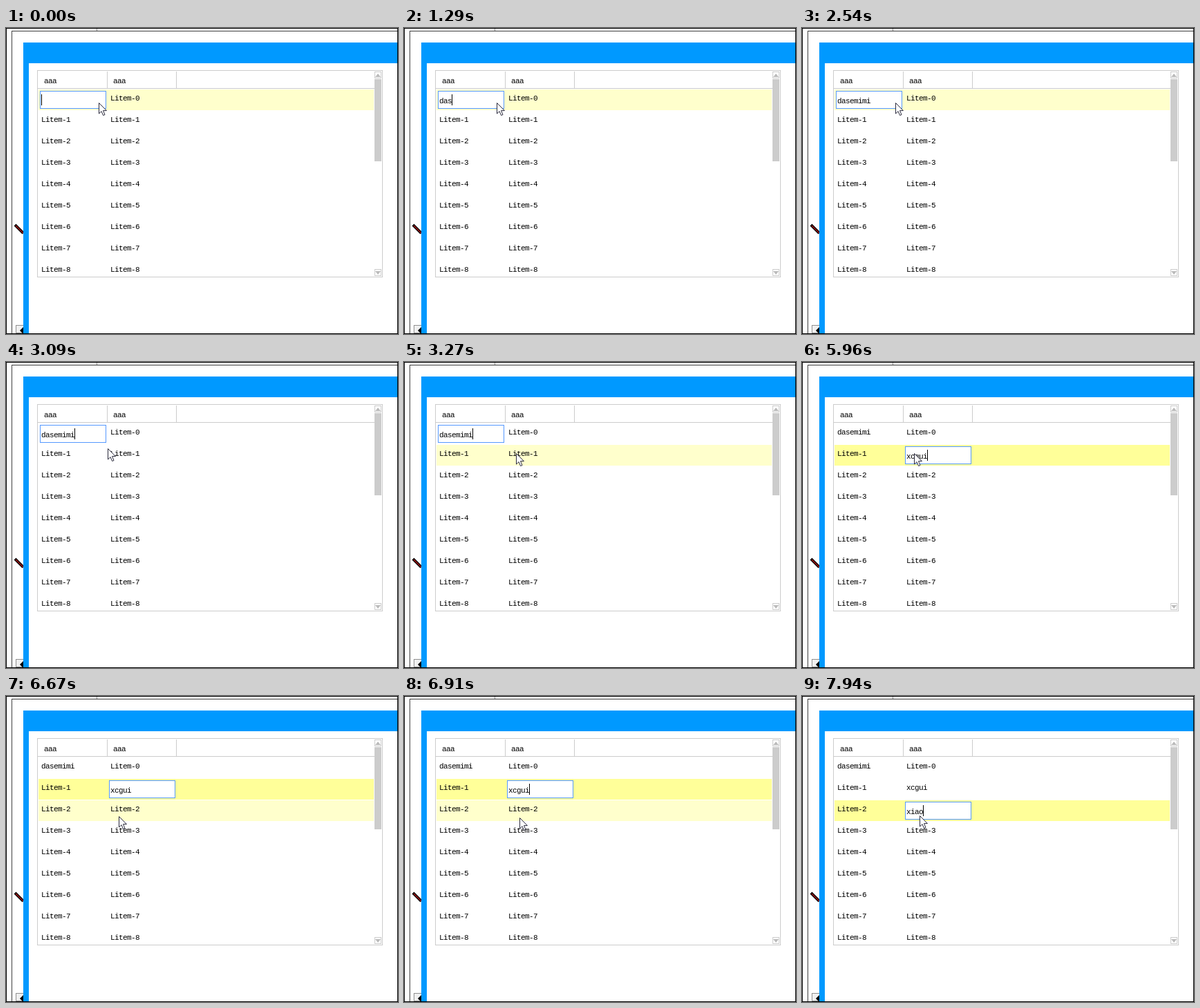
Recreate the animation shown at these times as an HTML page. Size 567 by 443 pixels, loop 8 s.

```html
<!DOCTYPE html>
<html>
<head>
<meta charset="utf-8">
<title>Editable list</title>
<style>
  html, body { margin: 0; width: 100%; height: 100%; overflow: hidden; background: #fff; }
  svg { display: block; }
  rect { shape-rendering: crispEdges; }
  text { font: 11px "Liberation Mono", monospace; letter-spacing: -.6px; }
</style>
</head>
<body>
<svg id="stage" width="567" height="443" viewBox="0 0 567 443"></svg>
<script>
const LOOP = 8000, ROW = 31, TOP = 89, COL = 100;
const fields = [{ row: 0, col: 0 }, { row: 1, col: 1 }, { row: 2, col: 1 }];
const finished = ['dasemimi', 'xcgui'];

// Time, field, text, caret position (-1: hidden)
const typing = [
  [0, 0, '', 0], [100, 0, '', -1], [560, 0, 'd', 1], [620, 0, 'da', 2],
  [800, 0, 'da', -1], [1040, 0, 'da', 3], [1290, 0, 'das', 3], [1320, 0, 'dase', 4],
  [1500, 0, 'dase', 5], [1530, 0, 'dasem', 5], [1870, 0, 'dasemi', -1],
  [2020, 0, 'dasemi', 6], [2080, 0, 'dasemim', 7], [2230, 0, 'dasemim', 8],
  [2260, 0, 'dasemimi', 8], [2540, 0, 'dasemimi', -1], [3030, 0, 'dasemimi', 8],
  [3300, 1, '', 0], [3790, 1, '', -1], [4280, 1, 'x', 1], [4490, 1, 'x', 2],
  [4520, 1, 'xc', 2], [4800, 1, 'xcg', 3], [4830, 1, 'xcg', 4], [5140, 1, 'xcgi', 4],
  [5290, 1, 'xcg', 3], [5570, 1, 'xcg', -1], [5600, 1, 'xcgu', -1],
  [5780, 1, 'xcgu', 4], [5840, 1, 'xcgu', 5], [5960, 1, 'xcgui', 5],
  [6610, 1, 'xcgui', -1], [6880, 1, 'xcgui', 5],
  [7090, 2, '', 0], [7610, 2, 'x', 1], [7700, 2, 'xi', 2], [7790, 2, 'xia', 3],
  [7940, 2, 'xiao', 4]
];

// Time, x, y
const pointer = [
  [0, 134, 108], [2540, 135, 108], [3030, 140, 114], [3060, 144, 119], [3090, 147, 125],
  [3120, 151, 128], [3150, 156, 130], [3180, 160, 131], [3210, 162, 132],
  [6270, 163, 132], [6580, 163, 139], [6610, 163, 152], [6640, 163, 166],
  [6670, 163, 174], [6880, 165, 175], [6910, 167, 176], [6940, 168, 180],
  [6970, 169, 184], [7000, 170, 182], [7030, 170, 177], [7060, 170, 173]
];

const at = (steps, t) => steps.findLast(step => step[0] <= t) || steps[0];
const rect = (x, y, w, h, fill) => `<rect x="${x}" y="${y}" width="${w}" height="${h}" fill="${fill}"/>`;
const frame = (x, y, w, h, color, fill = '#fff') =>
  rect(x, y, w, h, color) + rect(x + 1, y + 1, w - 2, h - 2, fill);
const path = (d, fill, extra = '') => `<path d="${d}" fill="${fill}" ${extra}/>`;
const label = (x, y, text) => `<text x="${x}" y="${y}">${text}</text>`;
const stripe = (row, color) => rect(47, TOP + ROW * row, 485, 30, color);

const backdrop =
  frame(0, 0, 567, 443, '#000') +
  rect(131, 1, 1, 3, '#808080') + rect(8, 4, 558, 1, '#404040') + rect(8, 4, 1, 438, '#404040') +
  path('M13 285L25 297', 'none', 'stroke="#000" stroke-width="4"') +
  path('M14 286L25 297', 'none', 'stroke="#a01010" stroke-width="1.6"') +
  frame(14, 430, 14, 12, '#909090', '#f0f0f0') + path('M20 438l5 -5v10z', '#000') +
  rect(25, 21, 541, 30, '#09f') + rect(25, 51, 8, 391, '#09f') + rect(33, 51, 533, 391, '#fff') +
  frame(45, 61, 500, 300, '#ccc') + rect(46, 87, 487, 1, '#ccc') +
  rect(146, 63, 1, 24, '#ccc') + rect(246, 63, 1, 24, '#ccc') +
  label(55, 80, 'aaa') + label(155, 80, 'aaa') +
  frame(533, 63, 10, 10, '#ccc') + path('M534 71h8l-4 -5z', '#bbb') +
  rect(533, 74, 10, 119, '#ccc') +
  frame(533, 349, 10, 10, '#ccc') + path('M534 352h8l-4 5z', '#bbb');

function cells(active) {
  let out = '';
  for (let row = 0; row < 9; row++) {
    for (let col = 0; col < 2; col++) {
      const field = fields.findIndex(f => f.row === row && f.col === col);
      if (field === active) continue;
      const text = field >= 0 && field < active ? finished[field] : 'Litem-' + row;
      out += label(51 + COL * col, 105 + ROW * row, text);
    }
  }
  return out;
}

function editor({ row, col }, text, caret) {
  const x = 49 + COL * col, y = 91 + ROW * row;
  return frame(x, y, 96, 26, '#59f') + label(x + 2, y + 18, text) +
    (caret < 0 ? '' : rect(x + 2 + 6 * caret, y + 5, 1, 16, '#000'));
}

function scene(t) {
  const [, active, text, caret] = at(typing, t);
  const [, x, y] = at(pointer, t);
  // Hover trails the pointer slightly and skips the gap between rows
  const depth = at(pointer, t - 30)[2] - TOP;
  const hover = depth % ROW < 30 ? stripe(Math.floor(depth / ROW), '#ffc') : '';
  const selected = active ? stripe(fields[active].row, '#ff9') : '';
  return backdrop + hover + selected + cells(active) + editor(fields[active], text, caret) +
    path('M.5 .5V16L4 12.6L6.6 18.5L9 17.5L6.5 11.6H11.4Z', '#fff',
      `stroke="#2a2a3c" transform="translate(${x} ${y})"`);
}

const stage = document.getElementById('stage');
let shown = '';
function draw() {
  const next = scene(performance.now() % LOOP);
  if (next !== shown) stage.innerHTML = shown = next;
  requestAnimationFrame(draw);
}
draw();
</script>
</body>
</html>
```
